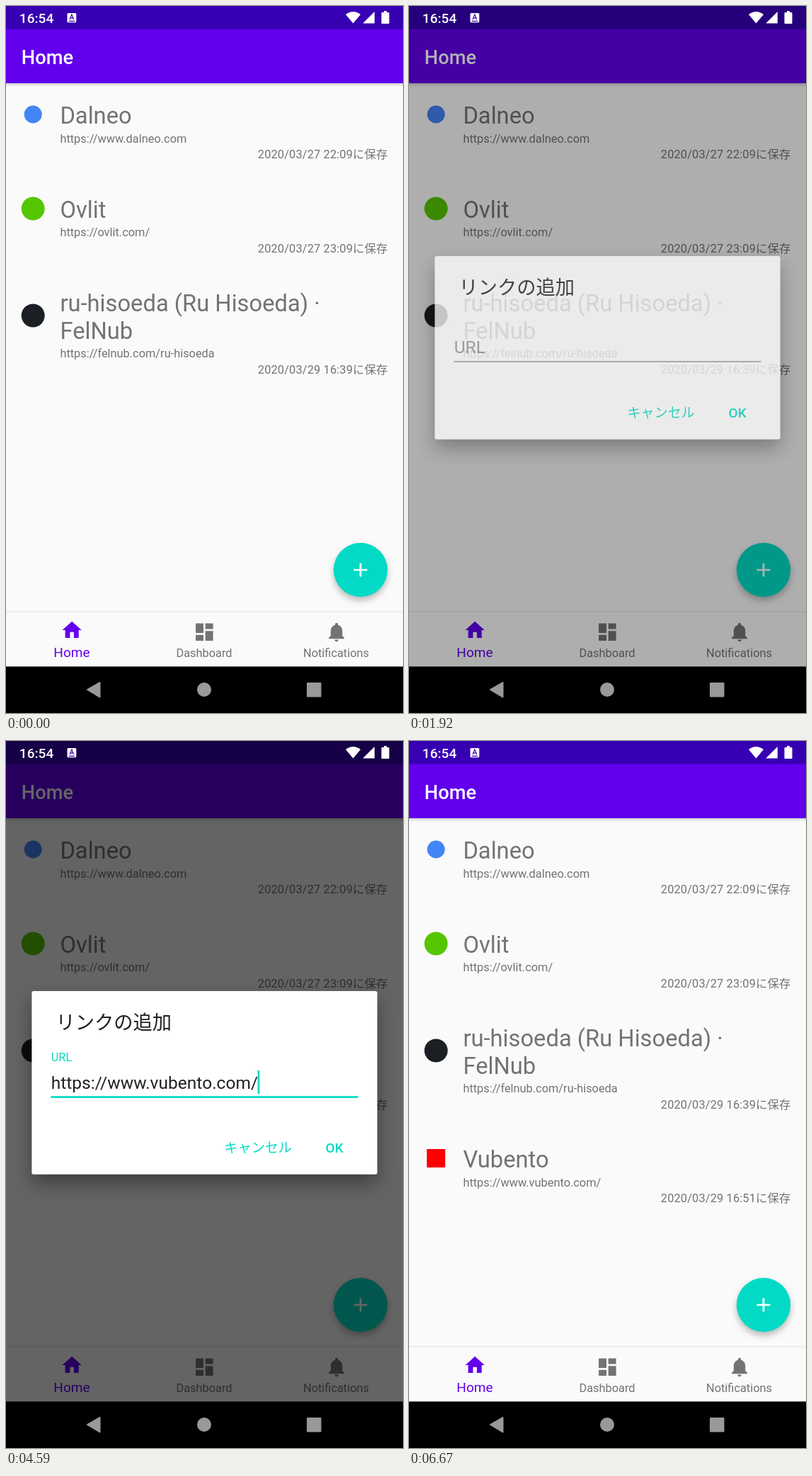
These frames come from a looping animation (561x998 px, 6.83 s). An HTML page:

```html
<!DOCTYPE html>
<html lang="ja">
<head>
<meta charset="utf-8">
<title>Saved links</title>
<style>
  html, body { margin: 0; width: 100%; height: 100%; overflow: hidden; background: #fafafa; }
  svg { display: block; width: 561px; height: 998px; }
  text { font-family: Roboto, "Noto Sans CJK JP", "Noto Sans CJK", sans-serif; white-space: pre; }
  .medium { font-weight: 500; }
  .title { font-size: 32.73px; }
  .small { font-size: 16.36px; }
  .label { font-size: 19.09px; }
  .field { font-size: 24.55px; }
  .heading { font-size: 27.27px; }
  .mid { text-anchor: middle; }
  .date { text-anchor: end; letter-spacing: .15px; }
  .grey { fill: #737373; }
  .teal { fill: #03dac5; }
  .purple { fill: #6200ee; }
  #fab { filter: drop-shadow(0 5px 5px rgba(0, 0, 0, .26)); }
  #sheet { filter: drop-shadow(0 13px 13px rgba(0, 0, 0, .36)); }
</style>
</head>
<body>
<svg viewBox="0 0 561 998">
  <defs>
    <linearGradient id="under" x2="0" y2="1">
      <stop stop-opacity=".16"/><stop offset="1" stop-opacity="0"/>
    </linearGradient>
    <linearGradient id="over" x2="0" y2="1">
      <stop stop-opacity="0"/><stop offset="1" stop-opacity=".07"/>
    </linearGradient>
  </defs>

  <rect width="561" height="998" fill="#fafafa"/>
  <g id="list"></g>

  <!-- app bar -->
  <rect y="109" width="561" height="5" fill="url(#under)"/>
  <rect width="561" height="109" class="purple"/>
  <rect width="561" height="32.7" fill="#3700b3"/>
  <text class="heading medium" x="21.8" y="81.7" fill="#fff">Home</text>

  <!-- add button -->
  <circle id="fab" class="teal" cx="501" cy="796" r="38.2"/>
  <path d="M491.5 796h19M501 786.5v19" stroke="#fff" stroke-width="2.7"/>

  <!-- bottom tabs -->
  <rect y="852.5" width="561" height="3.5" fill="url(#over)"/>
  <rect y="856" width="561" height="77" fill="#fafafa"/>
  <path class="purple" transform="translate(76.8 864.6) scale(1.364)"
    d="M10 20v-6h4v6h5v-8h3L12 3 2 12h3v8z"/>
  <path class="grey" transform="translate(264 867.3) scale(1.364)"
    d="M3 13h8V3H3zM3 21h8v-6H3zM13 21h8V11h-8zM13 3v6h8V3z"/>
  <path class="grey" transform="translate(450.7 867.3) scale(1.364)"
    d="M12 22c1.1 0 2-.9 2-2h-4c0 1.1.9 2 2 2zm6-6v-5c0-3-1.6-5.6-4.5-6.3V4a1.5 1.5 0 0 0-3 0v.7C7.6 5.4 6 8 6 11v5l-2 2v1h16v-1z"/>
  <text class="label purple mid" x="93" y="919">Home</text>
  <text class="small grey mid" x="280" y="919">Dashboard</text>
  <text class="small grey mid" x="466.5" y="919">Notifications</text>

  <rect id="dim" width="561" height="933" opacity="0"/>

  <g id="dialog" opacity="0">
    <rect id="sheet" x="36.4" y="353" width="488.2" height="258.7" rx="2.7" fill="#fff"/>
    <text class="heading" x="70.5" y="406.5" fill="#212121">リンクの追加</text>
    <text id="hint" class="field">URL</text>
    <text id="input" class="field" x="63.7" y="491.3" fill="#212121">https://www.vubento.com/</text>
    <rect id="line" x="63.4" width="434.2"/>
    <rect id="caret" class="teal" y="465" width="2.7" height="33"/>
    <text class="label teal medium" x="308.5" y="580.5">キャンセル</text>
    <text class="label teal medium" x="451.5" y="580.7">OK</text>
  </g>

  <!-- system bars -->
  <g fill="#fff">
    <text class="label medium" x="18.8" y="24">16:54</text>
    <rect x="86.5" y="10" width="12.8" height="13.3" rx="1.5"/>
    <path d="M480 12Q490.5 4 501 12L490.5 24.5z"/>
    <path d="M520.8 8v16.5H504.3z"/>
    <path d="M534 7h4v2h2.5q1 0 1 1v14q0 1-1 1h-9q-1 0-1-1V10q0-1 1-1H534z"/>
  </g>
  <path d="M90 19l2.9-7 2.9 7M91 16.8h3.8M89 21.3h8" fill="none" stroke="#3700b3" stroke-width="1.2"/>
  <rect y="932.4" width="561" height="65.6"/>
  <g fill="#999" stroke="#999" stroke-width="2" stroke-linejoin="round">
    <path d="M115 965l17.5-10v20.5z"/>
    <circle cx="280" cy="965" r="9"/>
    <rect x="426" y="956" width="18.5" height="18.5"/>
  </g>
</svg>

<script>
const LOOP = 6830;
const OPEN = 1845, FOCUS = 3050, PASTE = 3560, CLOSE = 4957, ADDED = 6380;
const FADE = 150, LINE_HEIGHT = 38.4;

const $ = id => document.getElementById(id);
const clamp = v => Math.max(0, Math.min(1, v));
const progress = (t, start, length) => clamp((t - start) / length);
const mix = (a, b, p) => a + (b - a) * p;
const easeOut = (p, power) => 1 - (1 - p) ** power;
const smooth = p => p * p * (3 - 2 * p);
const set = (el, attrs) => {
  for (const key in attrs) el.setAttribute(key, attrs[key]);
};

const disc = (y, r, fill) => `<circle cx="38.2" cy="${y}" r="${r}" fill="${fill}"/>`;
const square = (y, size, fill) =>
  `<rect x="${38.2 - size / 2}" y="${y - size / 2}" width="${size}" height="${size}" fill="${fill}"/>`;

// baseline of first line, title lines, address, saved at, icon
const items = [
  [166, ["Dalneo"], "https://www.dalneo.com", "2020/03/27 22:09", disc(153, 12.5, "#4285f4")],
  [298.6, ["Ovlit"], "https://ovlit.com/", "2020/03/27 23:09", disc(286, 16.5, "#55c500")],
  [431.2, ["ru-hisoeda (Ru Hisoeda) ·", "FelNub"], "https://felnub.com/ru-hisoeda",
    "2020/03/29 16:39", disc(437, 16.5, "#1b1f23")],
  [601.8, ["Vubento"], "https://www.vubento.com/", "2020/03/29 16:51", square(589, 26, "#f00")]
];

$("list").innerHTML = items.map(([y, lines, url, date, icon]) => {
  const last = y + (lines.length - 1) * LINE_HEIGHT;
  const title = lines.map((s, i) =>
    `<text class="title" x="76.4" y="${y + i * LINE_HEIGHT}">${s}</text>`).join("");
  return `<g class="grey">${icon}${title}
    <text class="small" x="76.4" y="${last + 26.8}">${url}</text>
    <text class="small date" x="539.6" y="${last + 49}">${date}に保存</text></g>`;
}).join("");

const added = $("list").lastElementChild;
const hint = $("hint"), input = $("input"), line = $("line"), caret = $("caret");

function draw(t) {
  const opening = progress(t, OPEN, FADE), closing = progress(t, CLOSE, FADE);
  set($("dim"), { opacity: 0.6 * (opening - closing) });
  set($("dialog"), { opacity: easeOut(opening, 2) - easeOut(closing, 3) });

  const focused = t >= FOCUS, pasted = t >= PASTE;
  const float = smooth(progress(t, FOCUS, 167));
  set(hint, {
    transform: `translate(63.7 ${mix(490, 452, float)}) scale(${mix(1, 2 / 3, float)})`,
    fill: focused ? "#03dac5" : "#979797"
  });
  set(line, {
    y: focused ? 501.2 : 501.3,
    height: focused ? 2.7 : 1.4,
    fill: focused ? "#03dac5" : "#858585"
  });
  set(input, { opacity: pasted ? 1 : 0 });

  const since = Math.min(t, CLOSE) - (pasted ? PASTE : FOCUS);
  const lit = focused && since % 1000 < 500;
  const end = pasted ? input.getComputedTextLength() : 0;
  set(caret, { x: 63.7 + end - 0.5, opacity: lit ? 1 : 0 });

  set(added, { opacity: progress(t, ADDED, 120) });
}

const start = performance.now();
function tick() {
  draw((performance.now() - start) % LOOP);
  requestAnimationFrame(tick);
}
tick();
</script>
</body>
</html>
```
